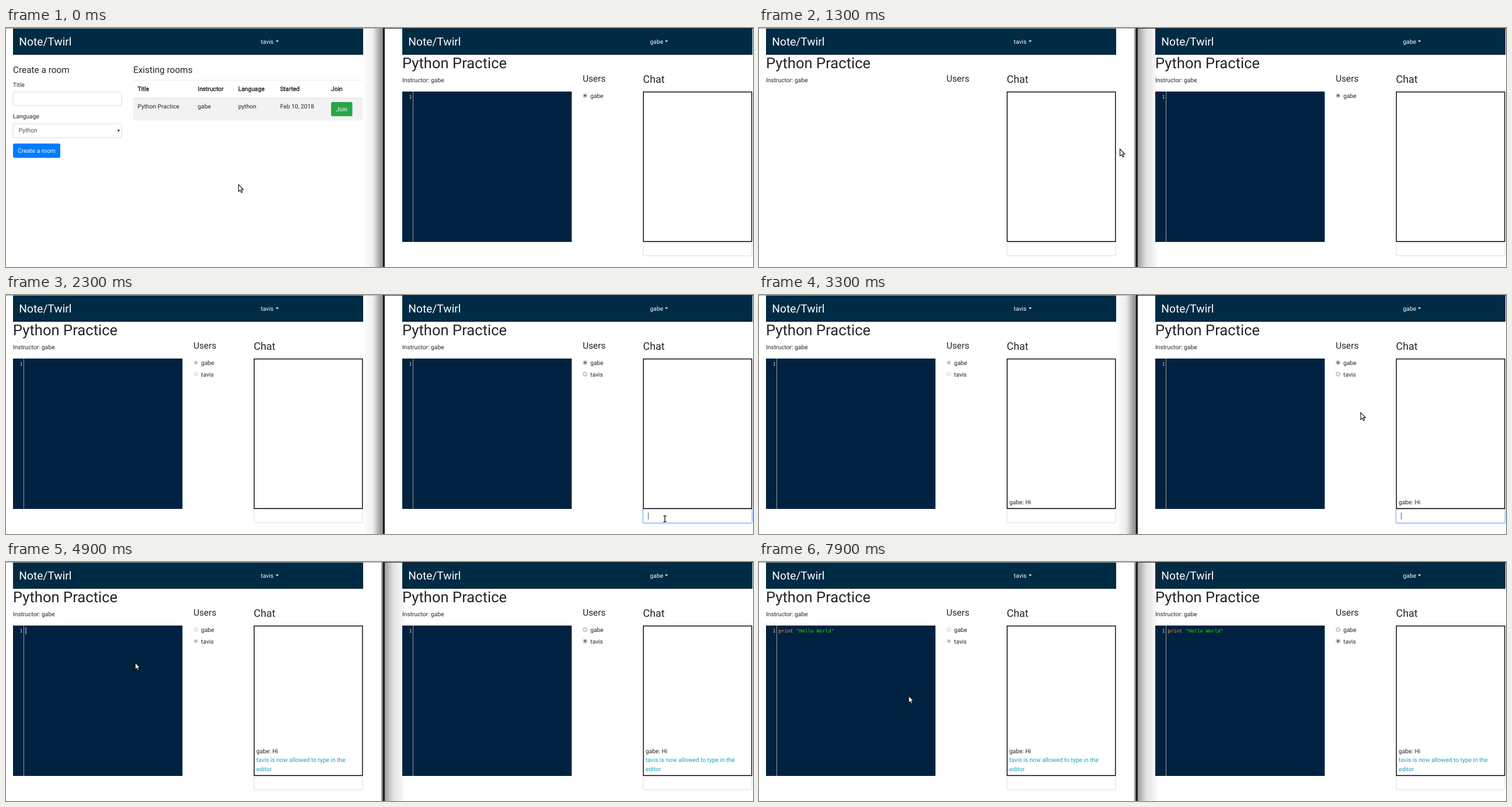
Recreate the animation shown at these times as an HTML page. Size 1280x410 px, loop 8000 ms.

```html
<!DOCTYPE html>
<html lang="en">
<head>
<meta charset="utf-8">
<title>Shared editor</title>
<style>
  html, body { margin: 0; width: 100%; height: 100%; overflow: hidden; background: #fff; }
  svg { display: block; width: 100%; height: 100%; }
  text { font-family: Roboto, sans-serif; white-space: pre; text-rendering: geometricPrecision; }
  .code { font-family: "DejaVu Sans Mono", monospace; }
  .strong { stroke: #212529; stroke-width: .4; }
</style>
</head>
<body>
<svg viewBox="0 0 1280 410">
  <defs>
    <linearGradient id="toLeft">
      <stop offset="0" stop-opacity="0"/>
      <stop offset=".55" stop-opacity=".07"/>
      <stop offset="1" stop-opacity=".42"/>
    </linearGradient>
    <linearGradient id="toRight">
      <stop offset="0" stop-opacity=".38"/>
      <stop offset=".4" stop-opacity=".12"/>
      <stop offset="1" stop-opacity="0"/>
    </linearGradient>
  </defs>
  <g id="scene"></g>
</svg>
<script>
const LOOP = 8000, STEP = 100, SHIFT = 667;
const BODY = 10.24, H1 = 25.6, H3 = 17.92, H4 = 15.36, CODE = 8.32, CHAR = 5.009;
const INK = '#212529', BORDER = '#ced4da', NAVY = '#002240';
const BRAND = 'Note/Twirl', TEACHER = 'gabe', STUDENT = 'tavis';
const SOURCE = 'print "Hello World"';

// Moments at which something switches
const HOVER = 600, ENTER = 1100, JOINED = 1500, CHAT = 2100, SENT = 2800,
      GRANT = 3900, EDIT = 4700, TYPED = 7350;

const pointer = [
  [100, 398, 268], [700, 572, 138], [1000, 572, 138], [1300, 618, 207],
  [1800, 1020, 338], [2100, 1129, 384], [2700, 1129, 384], [3600, 996, 137],
  [4000, 995, 135], [4500, 261, 165], [4900, 221, 172], [5400, 224, 169],
  [7300, 224, 169], [7900, 256, 229]
];
const typing = [[5200, 0], [5300, 1], [5700, 5], [6200, 7], [6300, 8], [7200, 16], [TYPED, 19]];

const linear = u => u;
const smooth = u => u * u * (3 - 2 * u);

function track(keys, t, ease) {
  if (t <= keys[0][0]) return keys[0].slice(1);
  for (let i = 1; i < keys.length; i++) {
    const [t0, ...from] = keys[i - 1], [t1, ...to] = keys[i];
    if (t < t1) {
      const u = ease((t - t0) / (t1 - t0));
      return from.map((v, k) => v + (to[k] - v) * u);
    }
  }
  return keys[keys.length - 1].slice(1);
}

const typedAt = t => Math.floor(track(typing, t, linear)[0] + 1e-6);

const text = (x, y, s, size = BODY, fill = INK, cls = '') =>
  `<text x="${x}" y="${y}" font-size="${size}" fill="${fill}" class="${cls}">${s}</text>`;

const rect = (x, y, w, h, fill, more = '') =>
  `<rect x="${x}" y="${y}" width="${w}" height="${h}" fill="${fill}" ${more}/>`;

const field = (x, y, w, h, stroke = BORDER) =>
  rect(x + .4, y + .4, w - .8, h - .8, '#fff', `rx="2.5" stroke="${stroke}" stroke-width=".8"`);

const button = (x, y, w, h, fill, label) =>
  rect(x, y, w, h, fill, 'rx="2.5"') + text(x + 8.3, y + 16, label, BODY, '#fff');

const nav = user =>
  rect(12, 1, 600, 44.7, '#002b44') + rect(12, 43.7, 600, 2, '#00223a') +
  text(22.3, 30, BRAND, 19.2, '#fff') + text(436.6, 26.5, user, BODY, '#fff') +
  '<path d="M462 21.4h5.4l-2.7 2.9z" fill="#fff"/>';

function lobby(hover) {
  const heads = ['Title', 'Instructor', 'Language', 'Started', 'Join'];
  const cells = ['Python Practice', TEACHER, 'python', 'Feb 10, 2018'];
  const cols = [225.4, 328.6, 398, 469.7, 557];
  return text(12, 77.4, 'Create a room', H4) + text(12, 100.5, 'Title') +
    field(12, 109.5, 186.5, 24) + text(12, 155, 'Language') + field(12, 164, 186.5, 24.5) +
    text(21.8, 179.4, 'Python', BODY, '#495057') +
    '<path d="M190.6 174.4h4.6l-2.3 4.2z" fill="#333"/>' +
    button(12, 198.3, 81, 24.5, '#007bff', 'Create a room') +
    text(218, 77.4, 'Existing rooms', H4) +
    rect(218, 89.3, 393, .8, '#dfe3e7') + rect(218, 120, 393, 38.7, '#f2f2f2') +
    rect(218, 119.6, 393, 1.2, '#dfe3e7') +
    heads.map((s, i) => text(cols[i], 108.3, s, BODY, INK, 'strong')).join('') +
    cells.map((s, i) => text(cols[i], 138.4, s)).join('') +
    button(557, 127, 36.5, 24.3, hover ? '#218838' : '#28a745', 'Join');
}

function radio(y, name, on, enabled) {
  const [edge, fill, dot] = enabled ? ['#8c8c8c', '#ededed', '#444'] : ['#cfcfcf', '#f3f3f3', '#999'];
  return `<circle cx="325.3" cy="${y}" r="3.4" fill="${fill}" stroke="${edge}" stroke-width=".8"/>` +
    (on ? `<circle cx="325.3" cy="${y}" r="1.8" fill="${dot}"/>` : '') +
    text(334.3, y + 3.8, name);
}

function editor(count, caret) {
  const word = SOURCE.slice(0, Math.min(count, 5));
  return rect(12, 109, 290.4, 258, NAVY) + rect(30, 109, .9, 258, '#aaa') +
    text(23.4, 120.6, '1', CODE, '#d0d0d0', 'code') +
    text(33.6, 120.6, word, CODE, word.length === 5 ? '#ff9e59' : '#fff', 'code') +
    text(33.6 + 6 * CHAR, 120.6, SOURCE.slice(6, Math.max(count, 6)), CODE, '#3ad900', 'code') +
    (caret ? rect(33.6 + count * CHAR, 112, .9, 12, '#fff') : '');
}

function chat(t, focus) {
  const lines = [];
  if (t >= SENT) lines.push([TEACHER + ': Hi', INK]);
  if (t >= GRANT) lines.push([STUDENT + ' is now allowed to type in the', '#17a2b8'], ['editor', '#17a2b8']);
  const draft = focus && t < SENT ? 'Hi'.slice(0, t >= 2600 ? 2 : t >= 2500 ? 1 : 0) : '';
  const caretX = 433.2 + [0, 7.3, 9.8][draft.length];
  return text(424.6, 94.2, 'Chat', H3) +
    (focus ? rect(423, 365.5, 190, 27.5, '#bfdeff', 'rx="4"') : '') +
    field(424.5, 366.8, 187, 24.4, focus ? '#80bdff' : BORDER) +
    rect(425.2, 109.7, 185.6, 256.6, '#fff', 'stroke="#000" stroke-width="1.4"') +
    lines.map(([s, c], i) => text(429, 358.6 - 15.2 * (lines.length - 1 - i), s, BODY, c)).join('') +
    text(433.2, 382.6, draft, BODY, '#495057') +
    (focus && (t - CHAT) % 1000 < 500 ? rect(caretX, 373, .8, 12, '#333') : '');
}

function room(t, own) {
  const joined = t >= JOINED, granted = t >= GRANT;
  const count = typedAt(own ? t - STEP : t);
  const since = t < 5300 ? t - EDIT : Math.max(0, t - TYPED);
  const caret = !own && t >= EDIT && since % 1060 < 530;
  return text(12, 69.4, 'Python Practice', H1) + text(12, 93.2, 'Instructor: ' + TEACHER) +
    text(321.2, 91.8, 'Users', H4) +
    (own || joined ? editor(count, caret) + radio(116, TEACHER, !granted, own) : '') +
    (joined ? radio(135.8, STUDENT, granted, own) : '') +
    chat(t, own && t >= CHAT && t < GRANT);
}

function frame(leftActive) {
  return rect(0, 0, 643, 1, '#a4a4a4') + rect(649, 0, 631, 1, '#2b2b2b') +
    (leftActive ? rect(649, 1, 36, 409, 'url(#toRight)') : rect(612, 1, 31, 409, 'url(#toLeft)')) +
    rect(643, 0, 3, 410, '#9c9c9c') + rect(645.6, 0, 3.4, 410, '#1d1d1d');
}

function cursor(t) {
  const [x, y] = track(pointer, t, smooth);
  const beam = t >= CHAT && t <= SENT;
  const shape = beam
    ? '<path d="M-2.6-5.2h2l.6.5.6-.5h2M-2.6 5.2h2l.6-.5.6.5h2M0-4.7v9.4" fill="none" stroke="#fff" stroke-width="2.6"/>' +
      '<path d="M-2.6-5.2h2l.6.5.6-.5h2M-2.6 5.2h2l.6-.5.6.5h2M0-4.7v9.4" fill="none" stroke="#111" stroke-width="1.3"/>'
    : '<path d="M.5.6v12l2.7-2.5 1.9 4.2 2-.9-1.9-4.1h3.6z" fill="#fff" stroke="#111" stroke-width="1.1"/>';
  return `<g transform="translate(${x.toFixed(2)} ${y.toFixed(2)})">${shape}</g>`;
}

function scene(t) {
  const leftActive = (t >= 1000 && t < CHAT) || t >= EDIT;
  return rect(0, 0, 1280, 410, '#fff') + frame(leftActive) +
    nav(STUDENT) + (t < ENTER ? lobby(t >= HOVER) : room(t, false)) +
    `<g transform="translate(${SHIFT} 0)">${nav(TEACHER)}${room(t, true)}</g>` + cursor(t);
}

const stage = document.getElementById('scene');
let shown = -1;

function tick() {
  const t = Math.floor(performance.now() % LOOP / STEP) * STEP;
  if (t !== shown) {
    stage.innerHTML = scene(t);
    shown = t;
  }
  requestAnimationFrame(tick);
}
tick();
</script>
</body>
</html>
```
